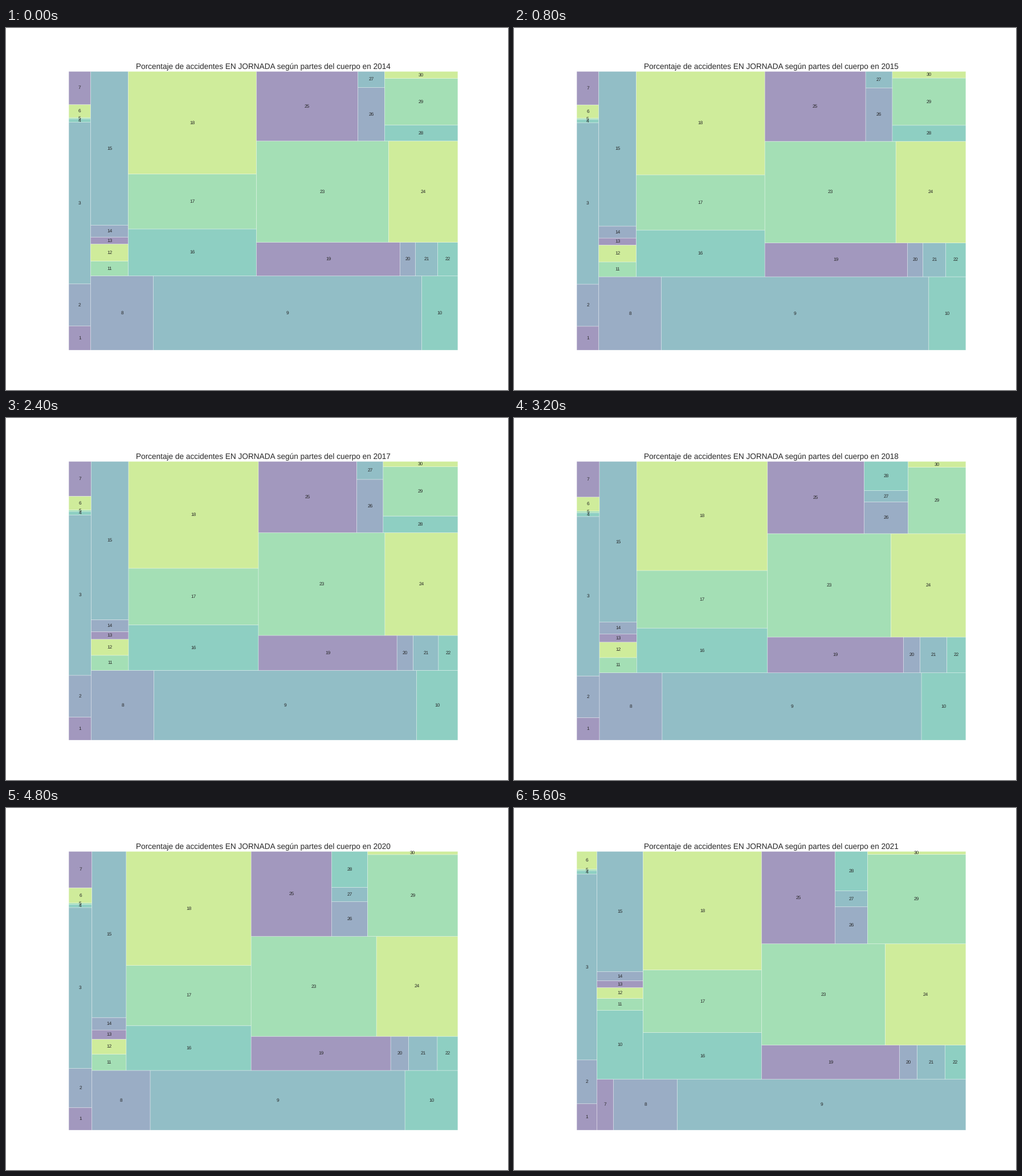
Write a matplotlib script that moves like this. It is 881 px wide and 636 px high and loops after 6.4 s.

```python
import matplotlib.pyplot as plt
import numpy as np
from matplotlib.animation import FuncAnimation
from matplotlib.patches import Rectangle

W, H, DPI = 881, 636, 64
PX = 72 / DPI  # points per stage pixel
SIDE = 100  # the treemap fills a square of 100 by 100 units
PALETTE = ["#46327e", "#365c8d", "#277f8e", "#1fa187", "#4ac16d", "#a0da39"]
INK = "#262626"
TITLE = "Porcentaje de accidentes EN JORNADA según partes del cuerpo en {}"

plt.rcParams["font.family"] = "Liberation Sans"
plt.rcParams["text.hinting"] = "none"

# Percentage of accidents per body part in three key years.
START = np.array([
    .488, .850, 3.261, .069, .026, .264, .668, 4.293, 18.383, 2.474,
    .513, .592, .237, .415, 5.333, 5.552, 6.494, 12.126, 4.447, .476,
    .688, .625, 12.350, 6.463, 6.505, 1.321, .396, 1.075, 3.149, .468])
TURN = np.array([
    .465, .882, 3.371, .085, .033, .308, .776, 3.734, 15.207, 2.865,
    .525, .505, .292, .408, 5.583, 5.320, 7.116, 13.555, 4.479, .574,
    .957, .620, 11.548, 7.410, 6.400, 1.267, .484, 1.225, 3.669, .249])
END = np.array([
    .492, .815, 3.462, .064, .0265, .330, .776, 2.998, 13.555, 2.931,
    .509, .460, .291, .388, 5.116, 5.101, 6.843, 12.951, 4.343, .556,
    .879, .653, 11.552, 7.527, 6.258, 1.108, .477, 1.180, 8.095, .268])


def shares(year):
    """Slow start up to 2019, then a quick change that levels off."""
    if year <= 2019:
        return START + (TURN - START) * ((year - 2014) / 5) ** 1.5
    return TURN + (END - TURN) * ((year - 2019) / 2) ** 0.5


def worst_ratio(areas, side):
    depth = sum(areas) / side
    return max(max(a / depth**2, depth**2 / a) for a in areas)


def treemap(areas):
    """Squarified layout: yield x, y, width, height from the lower left."""
    x, y, dx, dy = 0, 0, SIDE, SIDE
    while areas:
        side = min(dx, dy)
        n = 1
        while n < len(areas) and (worst_ratio(areas[:n + 1], side)
                                  <= worst_ratio(areas[:n], side)):
            n += 1
        strip, areas = areas[:n], areas[n:]
        depth = sum(strip) / side
        column = dx >= dy
        offset = 0
        for a in strip:
            length = a / depth
            if column:
                yield x, y + offset, depth, length
            else:
                yield x + offset, y, length, depth
            offset += length
        if column:
            x, dx = x + depth, dx - depth
        else:
            y, dy = y + depth, dy - depth


fig = plt.figure(figsize=(W / DPI, H / DPI), dpi=DPI, facecolor="white")
ax = fig.add_axes([0.125, 0.11, 0.775, 0.77])


def draw(i):
    year = 2014 + i
    ax.clear()
    ax.set(xlim=(0, SIDE), ylim=(0, SIDE))
    ax.axis("off")
    values = shares(year)
    areas = list(values / values.sum() * SIDE**2)
    for n, (x, y, w, h) in enumerate(treemap(areas)):
        ax.add_patch(Rectangle((x, y), w, h, alpha=0.5, fc=PALETTE[n % 6],
                               ec="white", lw=0.68 * PX, snap=False))
        ax.text(x + w / 2, y + h / 2, n + 1, color=INK, size=8.4 * PX,
                ha="center", va="center")
    ax.set_title(TITLE.format(year), color=INK, size=13.6 * PX,
                 pad=4.1 * PX, y=1)
    return []


anim = FuncAnimation(fig, draw, frames=8, interval=800, init_func=lambda: [],
                     repeat=True, repeat_delay=0)
plt.show()
```
